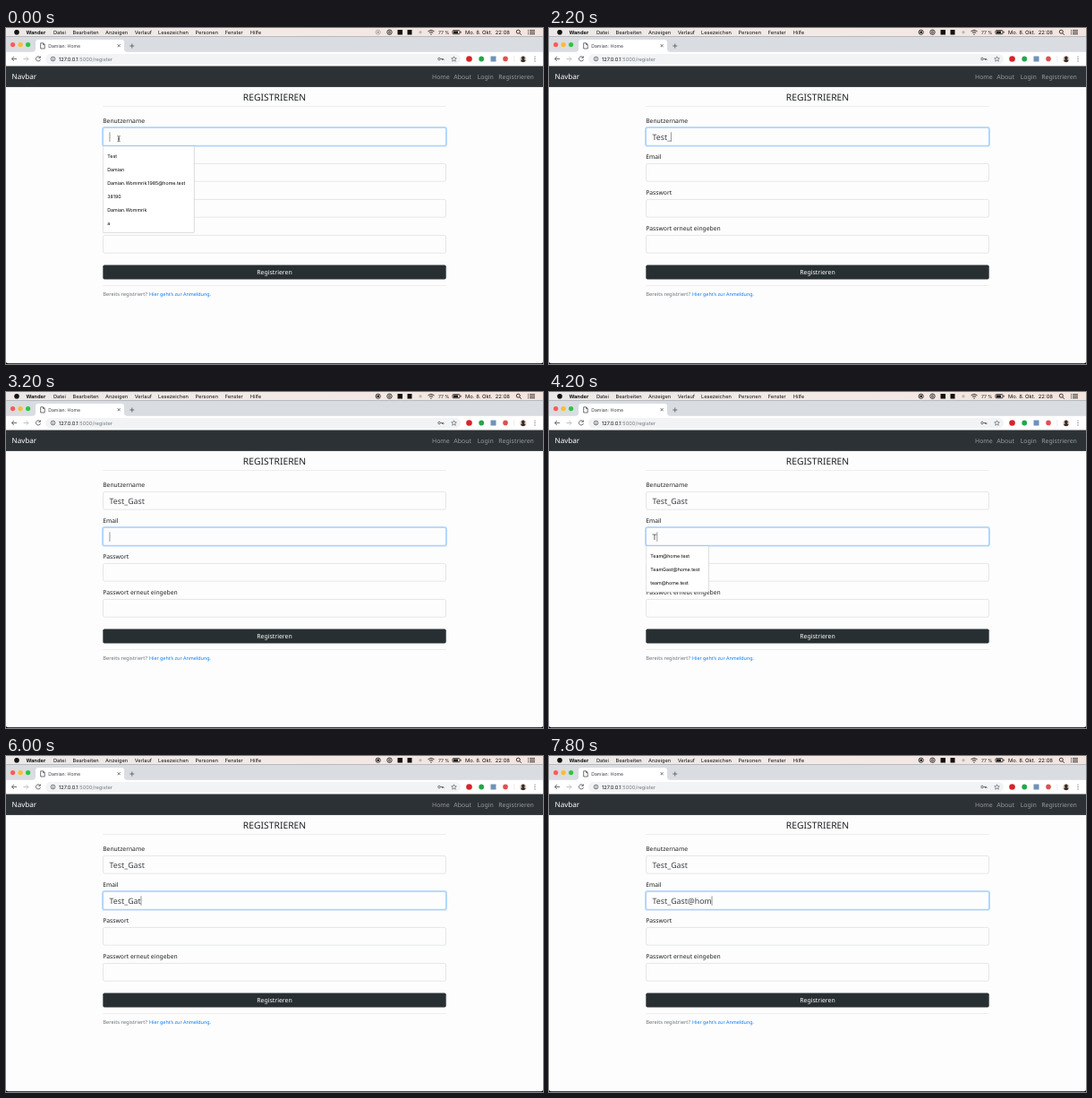
Recreate the animation shown at these times as an HTML page. Size 600x375 px, loop 8000 ms.

```html
<!DOCTYPE html>
<html lang="de">
<head>
<meta charset="utf-8">
<title>Registrieren</title>
<style>
html, body { margin: 0; width: 100%; height: 100%; overflow: hidden; background: #000; }
svg { display: block; width: 100%; height: 100%; }
text { text-rendering: geometricPrecision; white-space: pre; }
.ui { font: 5.7px Inter, sans-serif; fill: #111; }
.page { font: 6.75px "Noto Sans", sans-serif; fill: #1b1f22; }
.nav { font-size: 6.95px; fill: #999c9f; }
.value { font-size: 8.8px; fill: #3a3f44; }
.small { font-size: 5.4px; fill: #6c757d; }
.line { fill: none; stroke: #5f6368; stroke-width: .9; }
.field { fill: #fdfdfd; stroke: #c9ced3; stroke-width: .5; }
.field.focus { stroke: #80bdff; }
#ring { fill: none; stroke: #007bff; stroke-opacity: .27; stroke-width: 1.33; }
#list { filter: drop-shadow(0 .5px .7px rgba(0, 0, 0, .22)); }
#list rect { fill: #fff; stroke: #c8c8c8; stroke-width: .4; }
#list text { font-size: 5.3px; fill: #000; }
</style>
</head>
<body>
<svg viewBox="0 0 600 375">
  <defs>
    <linearGradient id="warm">
      <stop offset="0" stop-color="#ebe8e7"/>
      <stop offset=".5" stop-color="#f3eae6"/>
      <stop offset="1" stop-color="#f3e4de"/>
    </linearGradient>
  </defs>
  <rect y="20" width="600" height="354.3" rx="2" fill="#fdfdfd"/>

  <g id="menubar" class="ui">
    <rect width="600" height="9.2" fill="url(#warm)"/>
    <circle cx="12" cy="4.7" r="2.8"/>
    <text x="22.5" y="6.8" font-weight="700">Wander</text>
    <g id="record">
      <circle class="line" cx="415.7" cy="4.7" r="2.6" style="stroke:#222"/>
      <rect x="414.5" y="3.5" width="2.4" height="2.4"/>
    </g>
    <g class="line" style="stroke:#222">
      <circle cx="428.5" cy="4.7" r="2.7"/>
      <ellipse cx="428.5" cy="4.7" rx=".8" ry="1.3"/>
      <path d="M471.5 3.7q3.5-2.8 7 0M472.8 5.3q2.2-1.8 4.4 0M474.2 6.9h1.6"/>
      <rect x="499" y="2.7" width="8" height="4" rx=".7"/>
      <circle cx="572.3" cy="4.2" r="2"/>
      <path d="M573.8 5.7l2 2"/>
      <path d="M583 2.7h1m1 0h6M583 4.7h1m1 0h6M583 6.7h1m1 0h6"/>
    </g>
    <rect x="437.5" y="2" width="5.5" height="5.5"/>
    <rect x="448.5" y="2" width="5" height="5.5"/>
    <circle cx="463" cy="4.8" r="1.7" fill="#bbb"/>
    <rect x="500" y="3.5" width="5" height="2.4"/>
    <rect x="507.7" y="3.8" width=".8" height="1.8"/>
    <text x="483" y="6.8" font-size="5.1">77 %</text>
    <text x="513" y="6.8" font-size="5.9">Mo. 8. Okt.  22:08</text>
  </g>

  <g id="tabs" class="ui">
    <rect y="9.2" width="600" height="18" fill="#d9dce1"/>
    <circle cx="7.6" cy="18.6" r="2.6" fill="#fc5b57"/>
    <circle cx="16.1" cy="18.6" r="2.6" fill="#fdbc2e"/>
    <circle cx="24.6" cy="18.6" r="2.6" fill="#29c73f"/>
    <path d="M29 27q4 0 4-4V16q0-3 3-3h93q3 0 3 3v7q0 4 4 4z" fill="#fff"/>
    <path class="line" d="M38.7 16.8h3l1.5 1.5v4.7h-4.5zM41.5 17v1.6h1.6" stroke-width=".7"/>
    <text x="47.2" y="21.8" font-size="5.2" fill="#3c4043">Damian: Home</text>
    <path class="line" d="M124.6 18.2l3 3m0-3l-3 3M138.3 20h5m-2.5-2.5v5"/>
  </g>

  <g id="toolbar" class="ui">
    <rect y="26.8" width="600" height="15.9" fill="#fff"/>
    <path class="line" d="M12 34.5H6.5m2.5-2.5l-2.5 2.5l2.5 2.5"/>
    <path class="line" d="M19.5 34.5H25m-2.5-2.5l2.5 2.5l-2.5 2.5" style="stroke:#bbbdc0"/>
    <path class="line" d="M38 32.7a2.6 2.6 0 1 0 .5 2.4M38.4 31.4v2h-2"/>
    <rect x="44" y="29" width="464" height="11.2" rx="5.6" fill="#f1f3f4"/>
    <circle class="line" cx="52.5" cy="34.5" r="2.3" stroke-width=".6"/>
    <path class="line" d="M52.5 34.2v1.6M52.5 33v.5" stroke-width=".6"/>
    <text x="59" y="36.6">127.0.0.1<tspan fill="#777b80">:5000/register</tspan></text>
    <circle class="line" cx="484" cy="34.5" r="1.3"/>
    <path class="line" d="M485.3 34.5h3.6v1.6m-1.4-1.6v1.4"/>
    <path class="line" style="stroke-width:.7" d="M500.5 31.8l.8 1.8 2 .2-1.5 1.4.5 2-1.8-1.1-1.8 1.1.5-2-1.5-1.4 2-.2z"/>
    <circle cx="517.5" cy="34.5" r="3.3" fill="#d8232a"/>
    <circle cx="531.2" cy="34.5" r="2.9" fill="#20a84a"/>
    <rect x="541.5" y="31.5" width="6" height="6" fill="#6f92b7"/>
    <circle cx="558" cy="34.4" r="2.8" fill="#e04f4f"/>
    <path d="M567.8 31v7" stroke="#ddd" stroke-width=".6"/>
    <circle cx="577.8" cy="34.5" r="3.6" fill="#d9cec5"/>
    <path d="M575 36.8q.4-1.3 1.8-1.6a1.9 1.9 0 1 1 2 0q1.4.3 1.8 1.6a3.6 3.6 0 0 1-5.6 0" fill="#3a2b25"/>
    <path d="M591 32v.1m0 2.3v.1m0 2.3v.1" stroke="#5f6368" stroke-width="1.2" stroke-linecap="round"/>
  </g>

  <g id="page" class="page">
    <rect y="42.5" width="600" height="23.4" fill="#2c3135"/>
    <text x="6.5" y="57" font-size="8.1" fill="#fff">Navbar</text>
    <text class="nav" x="476" y="56.7">Home</text>
    <text class="nav" x="500.3" y="56.7">About</text>
    <text class="nav" x="526.7" y="56.7">Login</text>
    <text class="nav" x="550.3" y="56.7">Registrieren</text>
    <text x="300" y="80.8" font-size="10.35" text-anchor="middle">REGISTRIEREN</text>
    <path d="M108.3 87.5h383.4M108.3 287.5h383.4" stroke="#e2e2e2" stroke-width=".6"/>
    <g id="form"></g>
    <rect x="108.3" y="264.6" width="383.4" height="15.8" rx="1.7" fill="#282f32"/>
    <text x="300" y="275" font-size="6.95" text-anchor="middle" fill="#fff">Registrieren</text>
    <text class="small" x="108.2" y="298.5" style="font-size:5.75px">Bereits registriert?</text>
    <text class="small" x="160" y="298.5" style="fill:#007bff">Hier geht’s zur Anmeldung.</text>
  </g>

  <rect id="ring" x="107.67" width="384.66" height="21.3" rx="2.5"/>
  <path id="caret" stroke="#555" stroke-width=".6"/>
  <g id="list" class="ui"></g>
  <path id="pointer" fill="none" stroke="#333" stroke-width=".6"
        d="M124.3 120.4q1.7 0 1.7 1.2v4q0 1.2-1.7 1.2M127.7 120.4q-1.7 0-1.7 1.2v4q0 1.2 1.7 1.2M125 123.8h2"/>
</svg>

<script>
const DURATION = 8000;
const $ = id => document.getElementById(id);

function add(parent, tag, attrs, text = "") {
  const el = document.createElementNS("http://www.w3.org/2000/svg", tag);
  for (const key in attrs) el.setAttribute(key, attrs[key]);
  el.textContent = text;
  return parent.appendChild(el);
}

const fields = ["Benutzername", "Email", "Passwort", "Passwort erneut eingeben"].map((label, i) => {
  const y = 111.4 + 40 * i;
  add($("form"), "text", { x: 108.2, y: y - 5.6 }, label);
  const box = add($("form"), "rect", { class: "field", x: 108.5, y, width: 383, height: 19.8, rx: 1.9 });
  const value = add($("form"), "text", { class: "value", x: 115.6, y: y + 13.3 });
  return { y, box, value };
});

const allNames = ["Test", "Damian", "Damian.Wommrik.1985@home.test", "38190", "Damian.Wommrik", "a"];
const matches = ["Test", "Te"];
const mails = ["Team@home.test", "TeamGast@home.test", "team@home.test"];

// time, focused field, typed text, suggestions, caret visible
const steps = [
  [0, 0, "", allNames, true],
  [200, 0, "", allNames, false],
  [400, 0, "", allNames, true],
  [1000, 0, "T", allNames, true],
  [1200, 0, "T", matches, true],
  [1400, 0, "Te", matches, true],
  [1600, 0, "Test", ["Test"], true],
  [2200, 0, "Test_", [], true],
  [2600, 0, "Test_G", [], true],
  [2800, 0, "Test_Gas", [], true],
  [3000, 0, "Test_Gast", [], true],
  [3200, 1, "", [], true],
  [3400, 1, "", [], false],
  [3800, 1, "", [], true],
  [4000, 1, "T", [], true],
  [4200, 1, "T", mails, true],
  [4400, 1, "Te", mails, true],
  [4600, 1, "Test", mails, true],
  [5000, 1, "Test_", [], true],
  [5200, 1, "Test_", [], false],
  [5600, 1, "Test_G", [], true],
  [5800, 1, "Test_Ga", [], true],
  [6000, 1, "Test_Gat", [], true],
  [6400, 1, "Test_Ga", [], true],
  [6600, 1, "Test_Gas", [], true],
  [6800, 1, "Test_Gast", [], true],
  [7200, 1, "Test_Gast@", [], true],
  [7400, 1, "Test_Gast@h", [], true],
  [7600, 1, "Test_Gast@ho", [], true],
  [7800, 1, "Test_Gast@hom", [], true]
];

function drawList(items, y) {
  const list = $("list");
  list.replaceChildren();
  if (!items.length) return;
  const box = add(list, "rect", { x: 108.3, y, height: 15 * items.length + 6.4, rx: .6 });
  const widths = items.map((item, i) =>
    add(list, "text", { x: 113.3, y: y + 12.7 + 15 * i }, item).getComputedTextLength());
  box.setAttribute("width", Math.max(...widths) + 15);
}

function show([time, focus, text, items, caretOn]) {
  fields.forEach(({ box, value }, i) => {
    box.classList.toggle("focus", i === focus);
    value.textContent = i === focus ? text : i < focus ? "Test_Gast" : "";
  });
  const { y, value } = fields[focus];
  const caretX = 115.9 + (text ? value.getComputedTextLength() : 0);
  $("ring").setAttribute("y", y - .75);
  $("caret").setAttribute("d", `M${caretX} ${y + 4.9}v10.6`);
  $("caret").style.display = caretOn ? "" : "none";
  $("pointer").style.display = time < 200 ? "" : "none";
  $("record").style.opacity = Math.min(1, .3 + time / 570);
  drawList(items, y + 20.5);
}

const menu = { Datei: 53, Bearbeiten: 74.5, Anzeigen: 111, Verlauf: 143.7, Lesezeichen: 170, Personen: 211.5, Fenster: 244.7, Hilfe: 272.8 };
for (const name in menu) add($("menubar"), "text", { x: menu[name], y: 6.8 }, name);

const start = performance.now();
let current;
function tick() {
  const time = (performance.now() - start) % DURATION;
  const step = steps.findLast(([from]) => from <= time);
  if (step !== current) show(current = step);
  requestAnimationFrame(tick);
}
tick();
</script>
</body>
</html>
```
